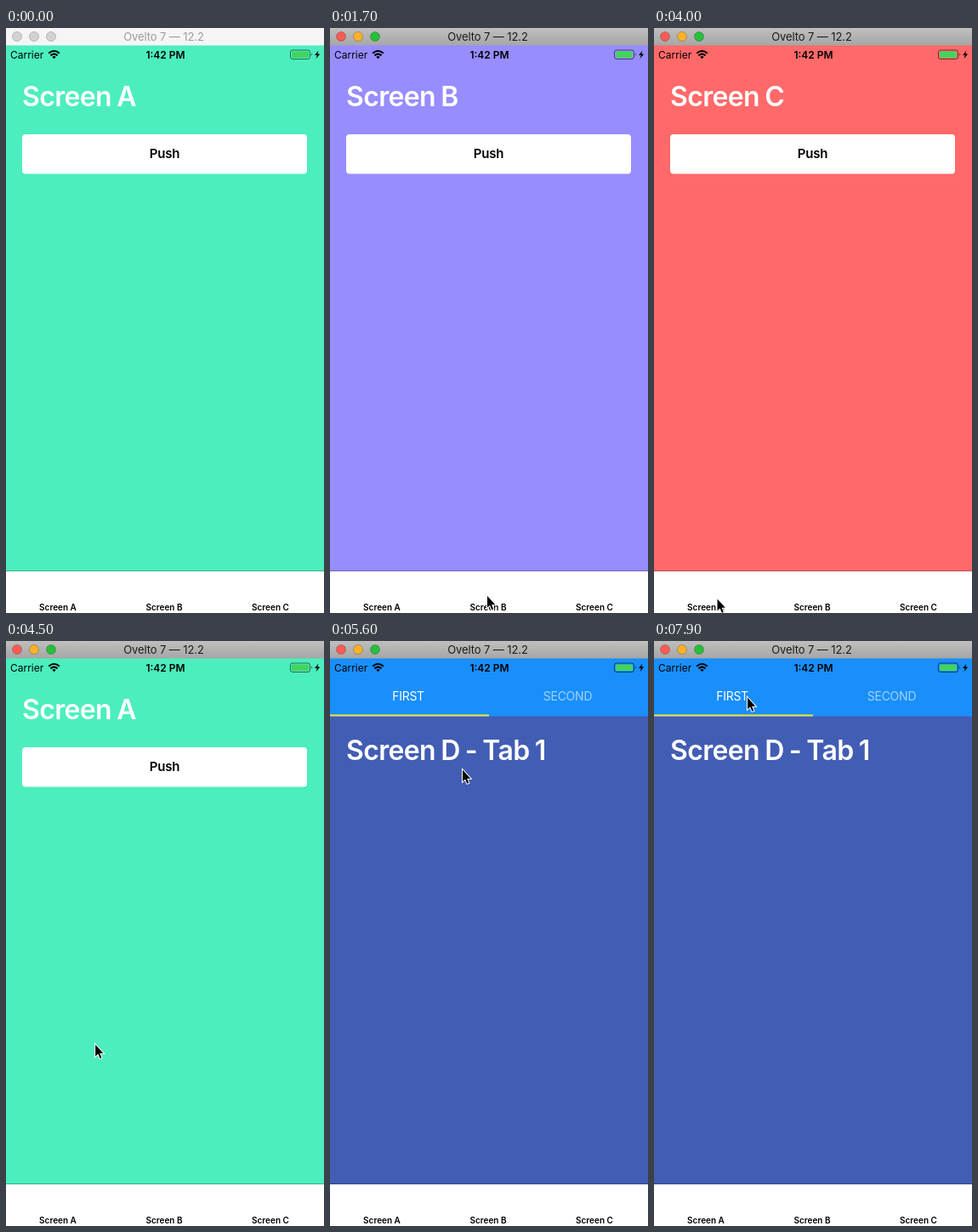
Write an HTML page that moves like this. It is 374 px wide and 688 px high and loops after 8 s.

```html
<!DOCTYPE html>
<html lang="en">
<head>
<meta charset="utf-8">
<title>Stack and tab navigation</title>
<style>
  html, body { margin: 0; width: 100%; height: 100%; overflow: hidden; background: #fff; }
  svg { display: block; width: 374px; height: 688px; }
  text { font-family: Inter, Roboto, sans-serif; font-size: 12px; }
  .title { font-size: 32px; font-weight: 600; letter-spacing: -.65px; word-spacing: -1.2px; fill: #fff; }
  .push { font-size: 15px; font-weight: 600; letter-spacing: -.2px; }
  .tab { font-size: 10px; font-weight: 600; }
  .top { font-size: 14px; letter-spacing: -.25px; fill: #fff; }
  .window { font-size: 13px; letter-spacing: -.1px; }
  .mid { text-anchor: middle; }
</style>
</head>
<body>
<svg viewBox="0 0 374 688">
  <defs>
    <linearGradient id="chrome" x2="0" y2="1">
      <stop stop-color="#bfbfbf"/><stop offset="1" stop-color="#a6a6a6"/>
    </linearGradient>
    <linearGradient id="edge">
      <stop stop-opacity="0"/><stop offset="1" stop-opacity=".24"/>
    </linearGradient>
  </defs>

  <g id="root">
    <rect id="rootColor" y="20" width="374" height="619"/>
    <text id="rootTitle" class="title" x="19" y="92"></text>
    <g id="button">
      <rect x="19" y="125" width="335" height="46.5" rx="4" fill="#fff"/>
      <text class="push mid" x="186.5" y="153">Push</text>
    </g>
  </g>
  <rect id="dim" y="20" width="374" height="619"/>

  <g id="detail">
    <rect x="-7" y="20" width="7" height="619" fill="url(#edge)"/>
    <rect y="20" width="374" height="619" fill="#fff"/>
    <g id="detailContent">
      <g id="pages">
        <rect y="88" width="374" height="551" fill="#425db4"/>
        <text class="title" x="19" y="140">Screen D - Tab 1</text>
        <rect x="374" y="88" width="374" height="551" fill="#673ab7"/>
        <text class="title" x="393" y="140">Screen D - Tab 2</text>
      </g>
      <rect y="20" width="374" height="68.5" fill="#198ffc"/>
      <text id="first" class="top mid" x="92" y="70">FIRST</text>
      <text id="second" class="top mid" x="279.5" y="70">SECOND</text>
      <rect id="indicator" y="86.5" width="187" height="2" fill="#f5e43c"/>
    </g>
  </g>

  <rect y="639" width="374" height="49" fill="#fff"/>
  <rect y="638" width="374" height="1" opacity=".25"/>
  <text class="tab mid" x="61" y="685">Screen A</text>
  <text class="tab mid" x="186" y="685">Screen B</text>
  <text class="tab mid" x="311" y="685">Screen C</text>

  <text x="5" y="36">Carrier</text>
  <g fill="none" stroke="#000" stroke-width="2.1">
    <path d="M50.2 29.8Q56.5 24.2 62.8 29.8M52.5 32.4Q56.5 29 60.5 32.4"/>
    <path d="M56.5 36.2L54.3 34Q56.5 32.2 58.7 34Z" fill="#000" stroke="none"/>
  </g>
  <text class="mid" x="187.5" y="35.5" font-weight="600">1:42 PM</text>
  <rect x="334.5" y="26" width="23" height="10.5" rx="2.4" fill="none" stroke="#000" stroke-opacity=".55"/>
  <rect x="336" y="27.5" width="20" height="7.5" rx="1.2" fill="#43d45c"/>
  <path d="M359 29.5Q361 31.2 359 33Z" opacity=".55"/>
  <path d="M367.5 26.5L363 32H365.8L364.6 36.2L369.2 30.5H366.3Z"/>

  <rect id="bar" width="374" height="20.5"/>
  <g id="lights">
    <circle cx="13" cy="10" r="5.5"/>
    <circle cx="33" cy="10" r="5.5"/>
    <circle cx="53" cy="10" r="5.5"/>
  </g>
  <text id="windowTitle" class="window mid" x="185.5" y="15">Ovelto 7 — 12.2</text>

  <path id="cursor" d="M.5 .5V14.3L3.6 11.4L5.9 16.8L7.8 16L5.6 10.7H9.8Z" stroke="#fff" stroke-width="2" paint-order="stroke"/>
</svg>

<script>
const LOOP = 8000, WIDTH = 374;
const ACTIVATE = 400, PRESS = 4900, RELEASE = 5100, PUSH = 5060, MOUNT = 5150;
const OPEN_SECOND = 6250, OPEN_FIRST = 7050;

const screens = [
  [0, 'A', '#4ceebd'],
  [1600, 'B', '#978dff'],
  [2400, 'C', '#ff6969'],
  [4050, 'A', '#4ceebd'],
];

// time, x, y of the pointer tip
const pointer = [
  [300, 250, 692], [1200, 185, 669], [1300, 185, 669], [1400, 184.5, 667.5],
  [1800, 184.5, 667.5], [2300, 323, 663], [3050, 323, 663], [3700, 74, 671],
  [4250, 74, 671], [4850, 155, 151], [5700, 155.5, 151], [6200, 284, 66],
  [6600, 284, 66], [7000, 108, 66], [7600, 108, 66], [7800, 109.5, 66],
];

const lightColors = ['#fb5b55', '#fcb12b', '#27bf3a'];
const el = id => document.getElementById(id);
const set = (id, attrs) => {
  for (const name in attrs) el(id).setAttribute(name, attrs[name]);
};
const shiftX = (id, x) => set(id, { transform: `translate(${Math.round(x)})` });
const clamp = v => Math.min(1, Math.max(0, v));
const ease = v => v * v * (3 - 2 * v);

// Critically damped spring from 0 to 1
function spring(ms) {
  const x = Math.max(0, ms) * .018;
  return 1 - (1 + x) * Math.exp(-x);
}

function pointerAt(t) {
  const next = pointer.findIndex(p => p[0] > t);
  if (next === 0) return [0, 720];
  if (next < 0) return pointer.at(-1).slice(1);
  const [t0, x0, y0] = pointer[next - 1], [t1, x1, y1] = pointer[next];
  const k = ease((t - t0) / (t1 - t0));
  return [x0 + (x1 - x0) * k, y0 + (y1 - y0) * k];
}

function renderWindow(active) {
  set('bar', { fill: active ? 'url(#chrome)' : '#f5f5f5' });
  set('windowTitle', { fill: active ? '#1c1c1c' : '#9c9c9c' });
  [...el('lights').children].forEach((light, i) => {
    light.setAttribute('fill', active ? lightColors[i] : '#d2d2d2');
    light.setAttribute('stroke', active ? 'rgba(0,0,0,.22)' : '#b8b8b8');
  });
}

function render(t) {
  renderWindow(t >= ACTIVATE);

  const [, name, color] = screens.findLast(s => s[0] <= t);
  set('rootColor', { fill: color });
  el('rootTitle').textContent = 'Screen ' + name;
  const fade = clamp((t - PRESS) / 150) - clamp((t - RELEASE) / 250);
  set('button', { opacity: 1 - .8 * fade });

  const push = spring(t - PUSH);
  shiftX('root', -.3 * WIDTH * push);
  set('dim', { opacity: .1 * push });
  shiftX('detail', t < PUSH ? WIDTH + 10 : WIDTH * (1 - push));
  set('detailContent', { visibility: t < MOUNT ? 'hidden' : 'visible' });

  const page = spring(t - OPEN_SECOND) - spring(t - OPEN_FIRST);
  shiftX('pages', -WIDTH * page);
  shiftX('indicator', WIDTH / 2 * page);
  set('first', { opacity: 1 - .4 * page });
  set('second', { opacity: .6 + .4 * page });

  set('cursor', { transform: `translate(${pointerAt(t)})` });
}

const start = performance.now();
function tick() {
  render((performance.now() - start) % LOOP);
  requestAnimationFrame(tick);
}
tick();
</script>
</body>
</html>
```
